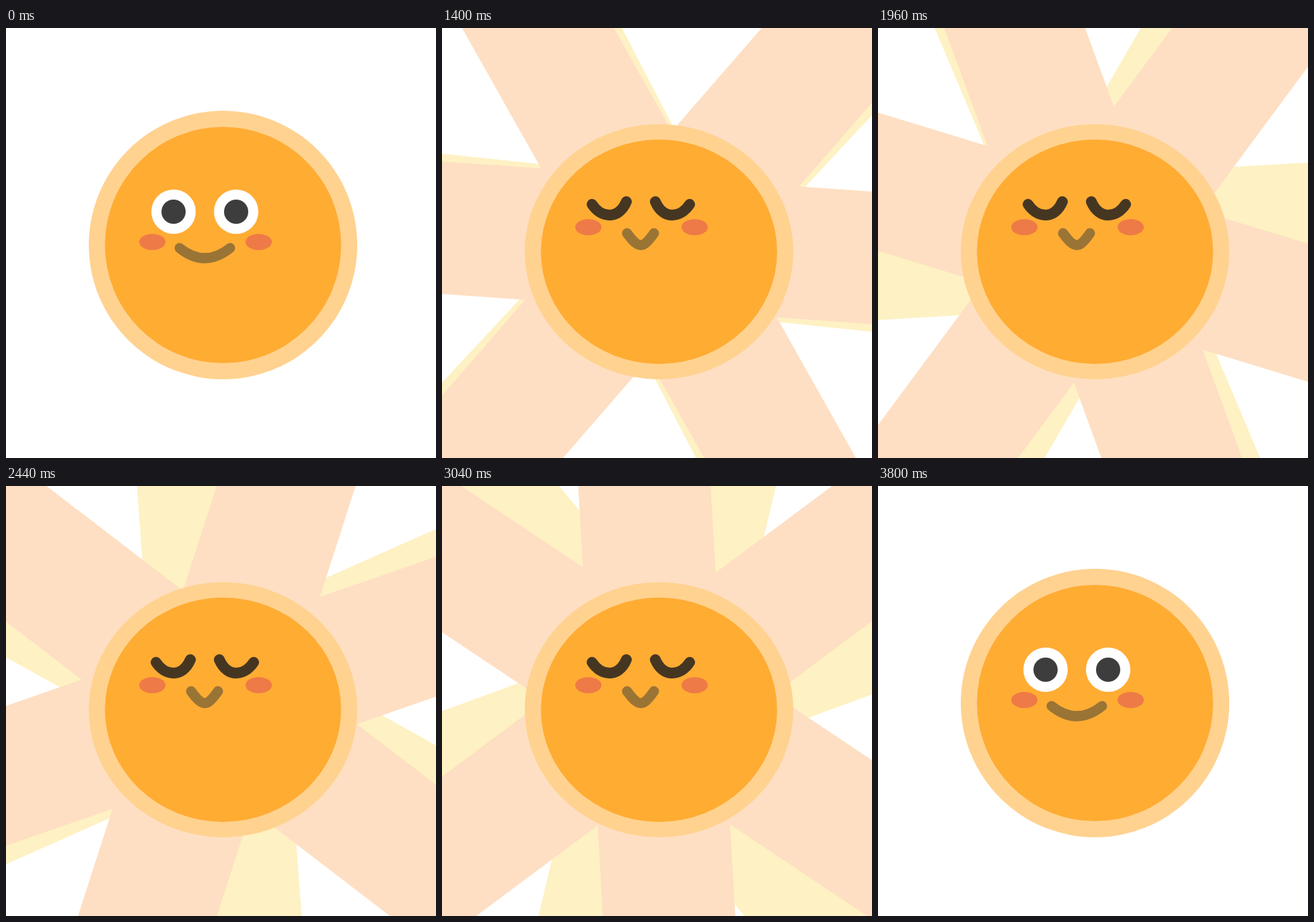
Write an HTML page that moves like this. It is 639 px wide and 639 px high and loops after 4.36 s.

```html
<!DOCTYPE html>
<html lang="en">
<head>
<meta charset="utf-8">
<title>Sleepy sun</title>
<style>
  html, body { margin: 0; height: 100%; overflow: hidden; background: #fff; }
  svg { display: block; width: 100vw; height: 100vh; }
  .line { fill: none; stroke-linecap: round; stroke-linejoin: round; }
  .mouth { stroke: #9a7435; stroke-width: 15; }
  .lid { stroke: #453622; stroke-width: 16; }
</style>
</head>
<body>
<svg viewBox="0 0 639 639">
  <defs>
    <g id="rays">
      <rect x="-600" y="-104.2" width="1200" height="196.5"/>
      <rect x="-600" y="-97.9" width="1200" height="196.5" transform="rotate(53)"/>
      <rect x="-600" y="-95.7" width="1200" height="196.5" transform="rotate(109.6)"/>
    </g>
  </defs>
  <g id="shine">
    <use id="back" href="#rays" fill="#fef1c3"/>
    <use id="front" href="#rays" fill="#fedfc3"/>
  </g>
  <g id="body">
    <circle cx="322.5" cy="322.5" r="199.5" fill="#ffd290"/>
    <circle cx="322.5" cy="322.5" r="175.5" fill="#ffac33"/>
  </g>
  <g id="cheeks" fill="#ee7a47">
    <ellipse cx="217.5" cy="318" rx="19.5" ry="12"/>
    <ellipse cx="375.5" cy="318" rx="19.5" ry="12"/>
  </g>
  <g id="awake">
    <g fill="#fff"><circle cx="249" cy="273" r="33"/><circle cx="342" cy="273" r="33"/></g>
    <g fill="#3d3d3d"><circle cx="249" cy="273" r="18"/><circle cx="342" cy="273" r="18"/></g>
    <path class="line mouth" d="M258 327Q295.5 357 333 327"/>
  </g>
  <g id="asleep">
    <path class="line lid" d="M223 262C236 282 262 286 274 258M317 258C329 286 355 282 368 262"/>
    <path class="line mouth" d="M275 305C292 328 298 329 315 305"/>
  </g>
</svg>
<script>
const LOOP = 4360, STEP = 40, SLEEP = 1040, WAKE = 3800;
const SPIN_START = 1008, SPIN_TIME = 2800, SPIN_TURN = 326.5;
const $ = id => document.getElementById(id);
const show = (id, on) => $(id).setAttribute('display', on ? 'inline' : 'none');
const transform = (id, value) => $(id).setAttribute('transform', value);

// cubic-bezier(.42, 0, .58, 1), solved by bisection
function easeInOut(x) {
  let lo = 0, hi = 1, s = 0.5;
  for (let i = 0; i < 24; i++) {
    s = (lo + hi) / 2;
    const at = 3 * (1 - s) * s * (0.42 * (1 - s) + 0.58 * s) + s ** 3;
    if (at < x) lo = s; else hi = s;
  }
  return s * s * (3 - 2 * s);
}

function draw(now) {
  const t = Math.floor((now % LOOP) / STEP) * STEP;
  const asleep = t >= SLEEP && t < WAKE;
  show('awake', !asleep);
  show('asleep', asleep);
  show('shine', asleep);
  transform('body', asleep ? 'translate(0 26.1) scale(1 .95)' : '');
  transform('cheeks', asleep ? 'translate(0 -22)' : '');
  if (asleep) {
    const turn = SPIN_TURN * easeInOut((t - SPIN_START) / SPIN_TIME) - 13.8;
    const spin = (id, angle) => transform(id, `translate(319.5 319.5) rotate(${angle})`);
    spin('front', 132 + turn);
    spin('back', 132 - turn);
  }
}

const start = performance.now();
function tick() {
  draw(performance.now() - start);
  requestAnimationFrame(tick);
}
tick();
</script>
</body>
</html>
```
